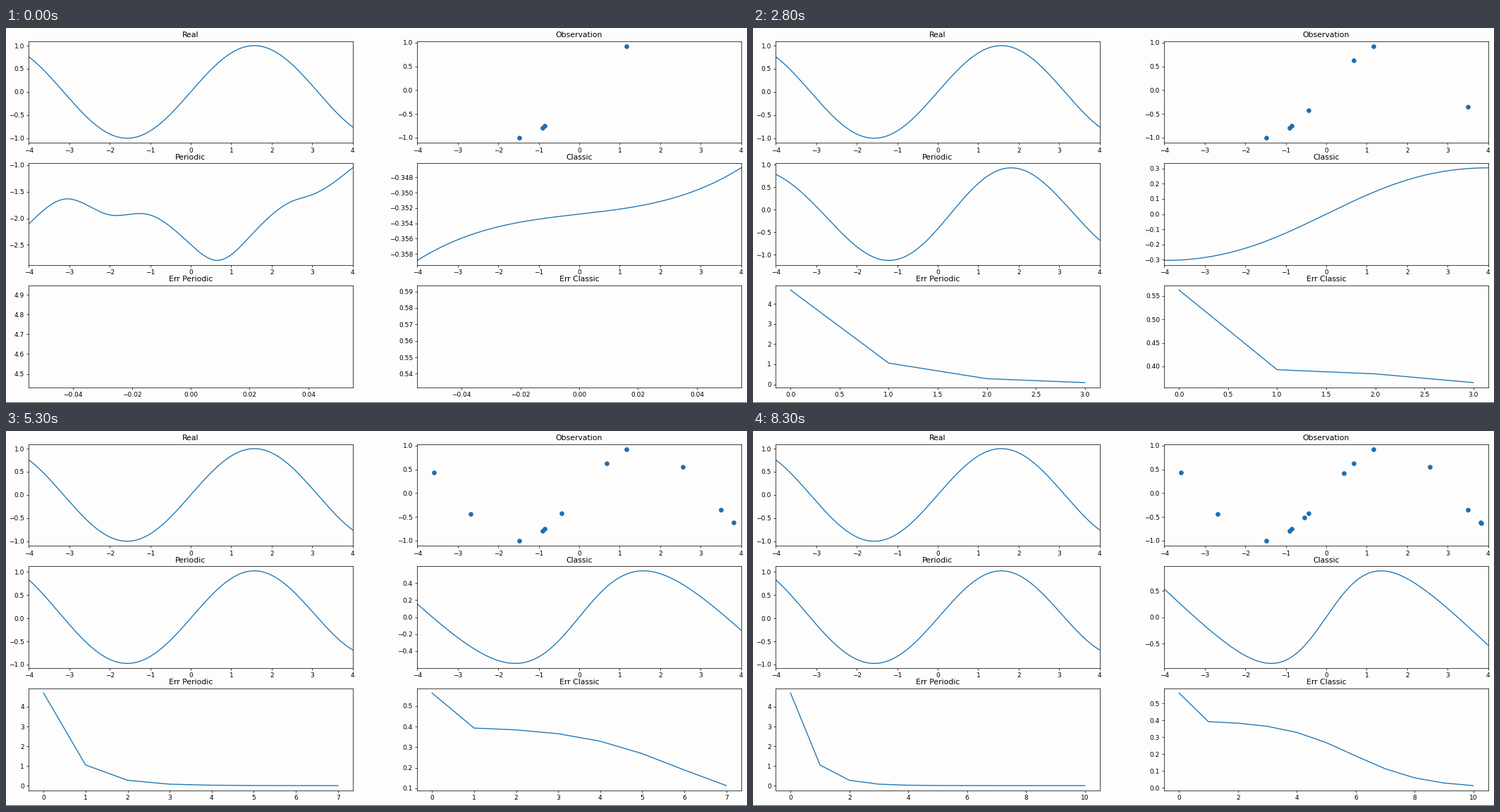
These frames come from a looping animation (1051x533 px, 8.4 s). A matplotlib script:

```python
import numpy as np
import matplotlib.pyplot as plt
from matplotlib.animation import FuncAnimation

W, H, DPI = 1051, 533, 64
K = 1.02  # scale of all type and line sizes
BLUE, DOT, PAPER = "#1f77b4", "#1c6db0", "#fdfdfd"
FRAMES, INTERVAL = 84, 100
STEP_MS, LEAD_MS, LAST = 787, 320, 10

plt.rcParams.update({
    "font.family": "DejaVu Sans", "font.size": 10 * K,
    "lines.linewidth": 1.5 * K, "axes.linewidth": 0.8 * K,
    "axes.titlepad": 6 * K, "axes.facecolor": PAPER, "figure.facecolor": PAPER,
    **{f"{a}tick.major.{k}": v * K
       for a in "xy" for k, v in (("size", 3.5), ("width", 0.8), ("pad", 3.5))},
})

X = np.linspace(-4, 4, 401)
SAMPLES = np.array([1.17, -0.85, -0.91, -1.48, 0.675, -0.43, 3.5,
                    -2.69, 3.81, 2.56, -3.59, 3.83, -0.54, 0.435])


def smooth(*points):
    """Natural cubic spline through a few points, taken at X."""
    px, py = np.array(points).T
    n = len(px)
    line = np.c_[np.ones(n), px]
    a = np.block([[abs(px[:, None] - px) ** 3, line],
                  [line.T, np.zeros((2, 2))]])
    w = np.linalg.solve(a, np.r_[py, 0, 0])
    return abs(X[:, None] - px) ** 3 @ w[:n] + w[n] + w[n + 1] * X


# Stages of the periodic fit: untrained, first step, skewed sine, settled sine
PERIODIC = [
    smooth((-4, -2.105), (-3.1, -1.635), (-2, -1.935), (-1.1, -1.918),
           (0, -2.49), (0.65, -2.79), (1.5, -2.31), (2.5, -1.68),
           (3, -1.555), (4, -1.05)),
    smooth((-4, 0.6), (-3.5, 0.42), (-3, -0.21), (-2, -1.545), (-1.25, -1.8),
           (0, -1.68), (1, -1.02), (2, 0.13), (2.45, 0.29), (3, 0.115),
           (4, -0.18)),
    1.03 * np.sin(np.polyval([-0.0035, 0.0066, 1.045, -0.325], X)) - 0.1,
    np.sin(X) + 0.012 * (1 - np.cos(2 * X)) + 0.06 * (X / 4) ** 8,
]


def periodic(step):
    stage = np.interp(step, range(7), [0, 1, 1.6, 2, 2.7, 2.9, 3])
    i = min(int(stage), 2)
    return PERIODIC[i] + (stage - i) * (PERIODIC[i + 1] - PERIODIC[i])


def classic(step):
    if step == 0:
        return 5.71e-5 * X**3 + 6e-4 * X - 0.3528
    keys = [1, 3, 6, 8, 9, 10]
    amp = np.interp(step, keys, [0.568, 0.89, 1.333, 2.04, 2.30, 2.42])
    rate = np.interp(step, keys, [0.175, 0.25, 0.56, 0.668, 0.706, 0.76])
    tilt = np.interp(step, keys, [0, 0.0934, 0.3265, 0.5817, 0.68, 0.735])
    return amp * np.tanh(rate * X) - tilt * X


def err_periodic(k):
    return 0.015 + 4.675 * np.exp(-1.5 * k**0.93)


def err_classic(k):
    return 0.4 / (1 + np.exp(0.82 * (k - 5.87))) + 0.166 * np.exp(-9 * k)


fig, axes = plt.subplots(3, 2, figsize=(W / DPI, H / DPI), dpi=DPI)
fig.subplots_adjust(left=32.4 / W, right=1042.6 / W, top=1 - 18.51 / H,
                    bottom=1 - 510.6 / H, wspace=0.2, hspace=0.2)
titles = ["Real", "Observation", "Periodic", "Classic",
          "Err Periodic", "Err Classic"]
lines = []
for ax, title in zip(axes.flat, titles):
    ax.set_title(title)
    ax.locator_params(axis="y", nbins=7)
    lines.append(ax.plot([], [], color=BLUE)[0])
for ax in axes[:2].flat:
    ax.set_xlim(-4, 4)

real, _, fit_per, fit_cla, loss_per, loss_cla = lines
real.set_data(X, np.sin(X))
dots = axes[0, 1].scatter([], [], s=36 * K**2, color=DOT, linewidths=1.3 * K)
axes[0, 1].set_ylim(-1.108, 1.033)
fig.add_artist(plt.Rectangle((0, 0), 1, 1 / H, color="#5c5c5c", lw=0))


def draw(frame):
    step = min(LAST, (frame * INTERVAL + LEAD_MS) // STEP_MS)
    seen = SAMPLES[:4 + step]
    dots.set_offsets(np.c_[seen, np.sin(seen)])
    fit_per.set_data(X, periodic(step))
    fit_cla.set_data(X, classic(step))
    k = np.arange(step + 1.0)
    loss_per.set_data(k, err_periodic(k))
    loss_cla.set_data(k, err_classic(k))
    for line in lines:
        if line is not lines[1]:
            line.axes.relim()
            line.axes.autoscale_view()
    return lines


anim = FuncAnimation(fig, draw, frames=FRAMES, interval=INTERVAL,
                     repeat=True, repeat_delay=0, blit=False)
plt.show()
```
